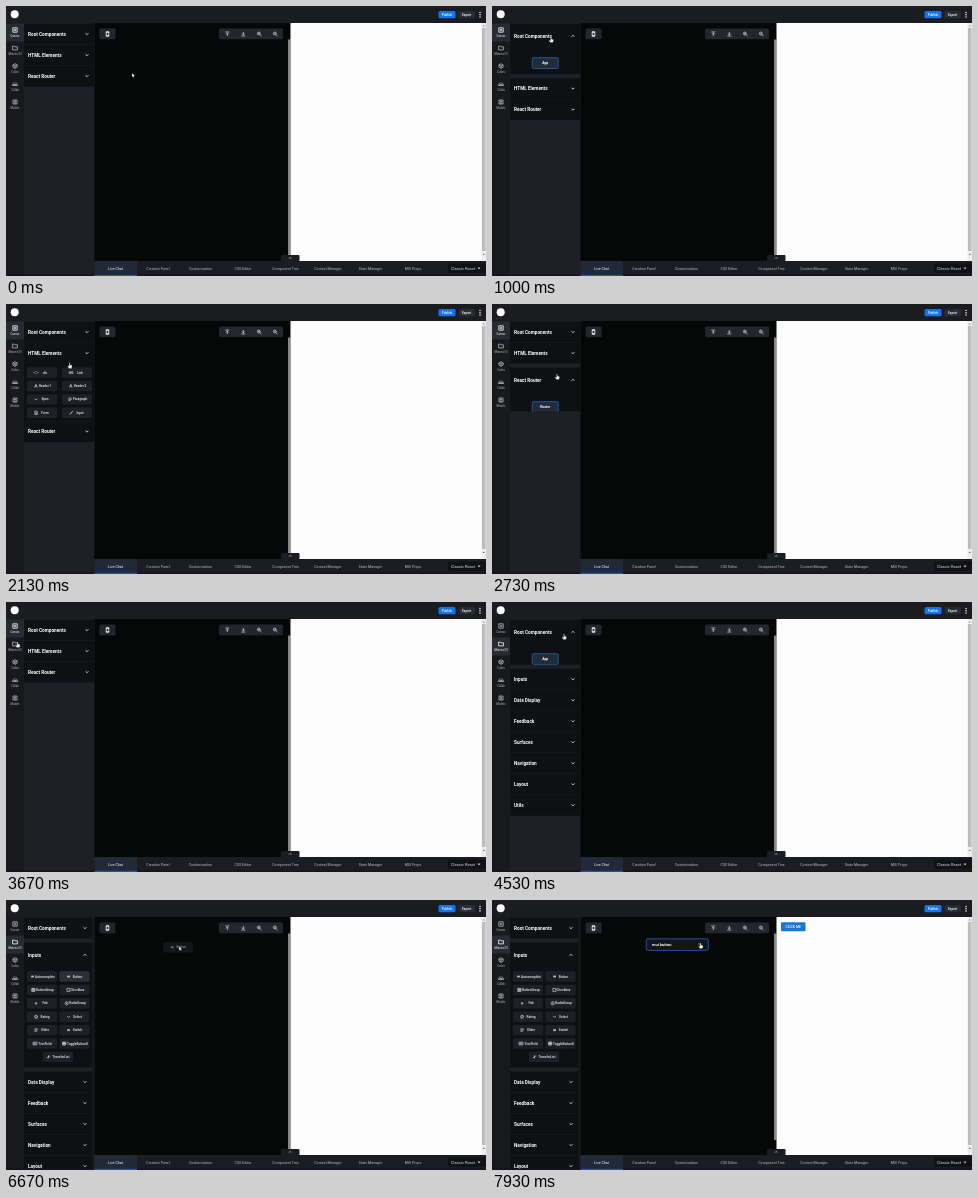
An HTML page for the animation above (8 s loop, 480 by 270 pixels).

```html
<!DOCTYPE html>
<html lang="en">
<head>
<meta charset="utf-8">
<title>Component editor</title>
<style>
html, body { margin: 0; width: 100%; height: 100%; overflow: hidden; background: #050807; }
svg { display: block; width: 100vw; height: 100vh; font-family: Roboto, Arial, sans-serif; }
</style>
</head>
<body>
<svg id="stage" viewBox="0 0 480 270"></svg>
<script>
const LOOP = 8000, STEP = 1000 / 15, PAGE_SWITCH = 3840, DROP = 6800;
const TOP = 17.5, HEAD = 21, GROW = 4, ROW = 13.4;

const rect = (x, y, w, h, fill, r = 0, extra = '') =>
  `<rect x="${x}" y="${y}" width="${w}" height="${h}" rx="${r}" fill="${fill}" ${extra}/>`;
const text = (s, x, y, size, fill = '#fff', weight = 400, anchor = 'middle') =>
  `<text x="${x}" y="${y + size * .355}" font-size="${size}" font-weight="${weight}" fill="${fill}" text-anchor="${anchor}">${s}</text>`;
const path = (d, x, y, color = '#e4e6e9', fill = 'none', width = .6) =>
  `<path d="${d}" transform="translate(${x} ${y})" stroke="${color}" fill="${fill}" stroke-width="${width}"/>`;

// Icons are drawn around their own centre.
const icons = {
  pill: 'M-1.3 0H1.3M-1.3 -.5H1.3M-1.3 .5H1.3',
  code: 'M-.7 -1.2L-1.9 0L-.7 1.2M.7 -1.2L1.9 0L.7 1.2',
  link: 'M-.3 -.9H-1.8V.9H-.3M.3 -.9H1.8V.9H.3M-.9 0H.9',
  head: 'M-1.3 1.6L0 -1.6L1.3 1.6M-.8 .5H.8',
  dash: 'M-1.4 -.3L0 .5L1.4 -.3',
  lines: 'M-1.7 -1.2H1.7M-1.7 0H1.7M-1.7 1.2H.6',
  page: 'M-1.2 -1.7H.6L1.3 -.9V1.7H-1.2ZM-.6 .2H.7M-.6 .9H.7',
  pen: 'M-1.6 1.6L1.5 -1.5M-1.2 1.6L1.7 -1.2',
  grid: 'M-1.6 -1.5H1.6V1.5H-1.6ZM-.5 -1.5V1.5M.6 -1.5V1.5M-1.6 0H1.6',
  box: 'M-1.5 -1.5H1.5V1.5H-1.5Z',
  plus: 'M-1.3 0H1.3M0 -1.3V1.3',
  radio: 'M-1.6 0A1.6 1.6 0 1 1 1.6 0A1.6 1.6 0 1 1 -1.6 0M-.5 0H.5M0 -.5V.5',
  star: 'M0 -1.8L.5 -.6L1.8 -.5L.8 .4L1.1 1.7L0 1L-1.1 1.7L-.8 .4L-1.8 -.5L-.5 -.6Z',
  field: 'M-2 -1.3H2V1.3H-2ZM-1.2 -.4H.3M-1.2 .4H1',
  swap: 'M-1.8 .7H.3M-.5 0L.3 .7L-.5 1.4M1.8 -.7H-.3M.5 -1.4L-.3 -.7L.5 0',
  people: 'M-2.6 1.5V.7L-1.5 .2L0 .7L1.5 .2L2.6 .7V1.5ZM-1.7 -1.2V-.4M1.7 -1.2V-.4M0 -1.7V-.5',
  folder: 'M-2.4 -1.9H-.6L0 -1.2H2.4V1.9H-2.4Z',
  cube: 'M0 -2.3L2.1 -1.1V1.1L0 2.3L-2.1 1.1V-1.1ZM-2.1 -1.1L0 0L2.1 -1.1M0 0V2.3',
  card: 'M-2 -2H2V2H-2ZM-1.2 1.2H1.2M-.5 -.9H.5V0H-.5Z',
  canvas: 'M-2.2 -2.2H2.2V2.2H-2.2ZM-1.3 0H1.3M0 -1.3V1.3',
  phone: 'M-1.3 -2.3H1.3V2.3H-1.3ZM-1.3 -1.6H1.3M-1.3 1.6H1.3',
  up: 'M-2 -2H2M0 2V-.8M-1.2 .3L0 -.9L1.2 .3',
  down: 'M-2 2H2M0 -2V.8M-1.2 -.3L0 .9L1.2 -.3',
  zoom: 'M.9 -.5A1.4 1.4 0 1 1 -1.9 -.5A1.4 1.4 0 1 1 .9 -.5M.5 .5L2.2 2.1'
};
const icon = (name, x, y, color, width) => path(icons[name], x, y, color, 'none', width);

const tiles = s => s.split(',').map(item => item.split(':'));
const solo = (name, label, open, close) => ({ name, items: [[label]], solo: true, open, close });
const closed = name => ({ name, items: [], open: Infinity, close: Infinity });
const basicPage = [
  solo('Root Components', 'App', 740, 1140),
  { name: 'HTML Elements', open: 1610, close: 2043, items: tiles(
    'div:code,Link:link,Header 1:head,Header 2:head,Span:dash,Paragraph:lines,Form:page,Input:pen,' +
    'Label:field,Button:pill,Image:box,Select:dash,List:lines,List Item:lines,Table:grid,Menu:lines') },
  solo('React Router', 'Router', 2610, 3270)
];
const muiPage = [
  solo('Root Components', 'App', 4400, 4810),
  { name: 'Inputs', open: 5310, close: Infinity, items: tiles(
    'Autocomplete:pill,Button:pill,ButtonGroup:grid,Checkbox:box,Fab:plus,RadioGroup:radio,Rating:star,' +
    'Select:dash,Slider:lines,Switch:pill,TextField:field,ToggleButtonG:grid,TransferList:swap') },
  ...['Data Display', 'Feedback', 'Surfaces', 'Navigation', 'Layout', 'Utils'].map(closed)
];

const moves = [
  [0, 126, 67], [60, 126, 67], [66, 111, 57], [200, 111, 57], [600, 59, 31], [1140, 59, 31],
  [1470, 63.5, 58], [2070, 63.5, 58], [2470, 65, 70], [3270, 65, 70], [3670, 11.5, 40],
  [3800, 11.5, 40], [4270, 72, 32], [4810, 72, 32], [5130, 64.5, 58], [5600, 64.5, 58],
  [5900, 69, 75], [6130, 69, 75], [DROP, 185, 43], [7070, 185, 43], [7400, 303, 26],
  [7550, 303, 26], [7870, 213, 40], [7930, 208.5, 43], [LOOP, 208.5, 43]
];

const clamp = v => Math.max(0, Math.min(1, v));
const smooth = v => v * v * (3 - 2 * v);

// The standard Material easing, cubic-bezier(.4, 0, .2, 1).
function ease(x) {
  let lo = 0, hi = 1;
  for (let i = 0; i < 14; i++) {
    const s = (lo + hi) / 2, u = 1 - s;
    if (1.2 * u * u * s + .6 * u * s * s + s ** 3 < x) lo = s; else hi = s;
  }
  return 3 * (1 - lo) * lo * lo + lo ** 3;
}
const progress = (p, t, ms) => ease(clamp((t - p.open) / ms)) - ease(clamp((t - p.close) / ms));

function pointer(t) {
  const i = moves.findIndex(m => m[0] > t);
  const [t0, x0, y0] = moves[i - 1], [t1, x1, y1] = moves[i];
  const k = smooth((t - t0) / (t1 - t0));
  return [x0 + (x1 - x0) * k, y0 + (y1 - y0) * k];
}

function tile([label, glyph], x, y, hover) {
  const mid = x + 3, half = Math.max(label.length * 1.68, 13) / 2;
  return rect(x - 15, y - 5.2, 30, 10.4, hover ? '#2b2f38' : '#1d2026', 1.5) +
    icon(glyph, mid - half - 2.4, y) + text(label, mid, y, 3.15, '#f1f2f4', 500);
}

function bodyTiles(p, y, width, t) {
  if (p.solo) {
    const mid = 18 + width / 2;
    return rect(mid - 13, y + 9.2, 26, 10.8, '#222b38', 1.5, 'stroke="#2468ad" stroke-width=".8"') +
      text(p.items[0][0], mid, y + 14.5, 3.4, '#fff', 700);
  }
  return p.items.map((item, i) => {
    const alone = i % 2 === 0 && i === p.items.length - 1;
    const x = alone ? 18 + width / 2 : i % 2 ? width + .5 : 36;
    const hover = item[0] === 'Button' && t > 5860 && t < 7060;
    return tile(item, x, y + 9 + ROW * (i >> 1), hover);
  }).join('');
}

function sidebar(t) {
  const page = t < PAGE_SWITCH ? basicPage : muiPage;
  let y = TOP;
  const panels = page.map((p, i) => {
    const grow = progress(p, t, 100) * GROW;
    const full = p.solo ? 25.5 : Math.ceil(p.items.length / 2) * ROW + 6.2;
    const top = y + (i ? grow : 0), body = top + HEAD + grow;
    const height = full * progress(p, t, 260);
    y = body + height + grow;
    return { p, top, body, height, mid: (top + body) / 2 };
  });
  const over = y > 270, width = over ? 68 : 70.5;
  let out = rect(18, 17, 70.5, 253, '#1e2025');
  for (const { p, top, body, height, mid } of panels) {
    out += rect(18, top, width, body + height - top, '#0e1013') +
      rect(18, top, width, .4, '#1b1d21') + text(p.name, 22, mid, 4.7, '#fff', 700, 'start');
    const isOpen = t >= p.open && t < p.close;
    out += path(isOpen ? 'M-1.4 .7L0 -.7L1.4 .7' : 'M-1.4 -.7L0 .7L1.4 -.7', over ? 79 : 81, mid, '#fff', 'none', .8);
    if (height > .1) {
      out += `<svg x="18" y="${body}" width="${width}" height="${height}" viewBox="18 0 ${width} ${height}">` +
        bodyTiles(p, 0, width, t) + '</svg>';
    }
  }
  if (over) out += rect(86, 17, 2.5, 253, '#16181c');
  return out;
}

function rail(t) {
  const active = t < PAGE_SWITCH ? 0 : 1;
  const items = [['Canvas', 'canvas'], ['Material UI', 'folder'], ['Codes', 'cube'], ['Collab', 'people'], ['Models', 'card']];
  return rect(0, 17, 18, 253, '#17191d') + rect(0, TOP + 18 * active, 18, 18, '#282b32') +
    items.map(([label, glyph], i) => {
      const color = i === active ? '#fff' : '#b4b7bc';
      return icon(glyph, 9, 24 + 18 * i, color, .8) + text(label, 9, 30 + 18 * i, 2.7, color);
    }).join('');
}

function topBar() {
  return rect(0, 0, 480, 17, '#1a1c20') + '<circle cx="8.7" cy="8.3" r="4" fill="#fff"/>' +
    rect(432.5, 5, 17, 7.3, '#1375e8', 1.5) + text('Publish', 441, 8.6, 3.2, '#fff', 500) +
    rect(452.5, 5, 16.5, 7.3, '#292c32', 1.5) + text('Export', 460.7, 8.6, 3.2, '#fff', 500) +
    [6.5, 8.7, 10.9].map(y => `<circle cx="474" cy="${y}" r=".75" fill="#fff"/>`).join('');
}

function workspace(t) {
  const dropped = t >= DROP;
  let out = rect(88.5, 17, 194, 238, '#050807') +
    rect(93.5, 22.5, 16, 10.8, '#23262d', 1.5) + icon('phone', 101.5, 28, '#fff', .8) +
    rect(213, 22.5, 64, 10.8, '#23262d', 1.5) +
    ['up', 'down', 'zoom', 'zoom'].map((g, i) => icon(g, 221.3 + 16 * i, 28, '#e6e7e9', .7)).join('') +
    path('M-1.2 -.5H.3M-.45 -1.2V.2', 253.3, 28, '#e6e7e9', 'none', .4) +
    path('M-1.2 -.5H.3', 269.3, 28, '#e6e7e9', 'none', .4) +
    rect(282, 33.5, 2.5, dropped ? 206.5 : 215.5, '#85888b') +
    rect(284.5, 17, 195.5, 238, '#fdfdfd') + rect(475.5, 17, 4.5, 238, '#eeeeee') +
    rect(476, 22, 3.5, 223, '#bdbdbd') +
    path('M-.9 .5L0 -.5L.9 .5Z', 477.8, 19.8, '#777', '#777', .2) +
    path('M-.9 -.5L0 .5L.9 -.5Z', 477.8, 248.5, '#444', '#444', .2);
  if (dropped) {
    out += rect(154.3, 38.8, 62, 11.6, '#12151a', 1.5, 'stroke="#1f65b5" stroke-width=".8"') +
      text('mui button', 160, 44.2, 4, '#fff', 700, 'start') +
      path('M-1.2 -1.2L1.2 1.2M1.2 -1.2L-1.2 1.2', 207.2, 44.2, '#8d9299') +
      rect(289, 22.3, 24.5, 9, '#1976d2', 1) + text('CLICK ME', 301.2, 26.7, 3.5, '#fff', 500);
  }
  return out;
}

function bottomBar() {
  const tabs = ['Live Chat', 'Creation Panel', 'Customization', 'CSS Editor', 'Component Tree', 'Context Manager', 'State Manager', 'MUI Props'];
  return rect(88.5, 255, 391.5, 15, '#1b1d22') + rect(0, 268.5, 480, 1.5, '#1a1020') +
    rect(88.5, 255, 42.5, 15, '#222939') + rect(88.5, 268.8, 42.5, 1.2, '#2b4da0') +
    tabs.map((s, i) => text(s, 109.5 + 42.5 * i, 262.4, 3.6, i ? '#b8bbc0' : '#fff')).join('') +
    rect(442, 257.5, 38, 9.5, '#101216', 1) + text('Classic React', 445, 262.4, 4, '#e2e3e5', 400, 'start') +
    path('M-1.2 -.6L0 .7L1.2 -.6Z', 473, 262.4, '#fff', '#fff', .2) +
    rect(275, 249, 18.5, 6.2, '#1b1d22', 1) + path('M-1.2 .6L0 -.6L1.2 .6', 284.2, 252, '#fff');
}

function cursor(t) {
  const [x, y] = pointer(t), dragging = t > 6130 && t < DROP;
  const hand = !dragging && (x < 88 || x > 289 || t > 7850);
  const ghost = dragging ? `<g opacity=".6">${tile(['Button', 'pill'], x - 1, y + 1)}</g>` : '';
  const shape = hand
    ? 'M-.5 .2Q0 -.4 .5 .2V2L2.2 2.5Q2.7 2.7 2.5 3.5L2 5.6H-.7L-2 3.4Q-2 2.8 -1.3 3L-.5 3.7Z'
    : 'M0 0V4.2L1 3.3L1.7 4.8L2.3 4.5L1.7 3.1H3Z';
  return ghost + path(shape, x, y, '#222', '#fff', .3);
}

const stage = document.getElementById('stage');
function draw(now) {
  const t = Math.floor((now % LOOP + 7) / STEP) * STEP % LOOP;
  stage.innerHTML = workspace(t) + sidebar(t) + rail(t) + topBar() + bottomBar() + cursor(t);
  requestAnimationFrame(draw);
}
const start = performance.now();
const frame = draw;
draw = () => frame(performance.now() - start);
draw();
</script>
</body>
</html>
```
